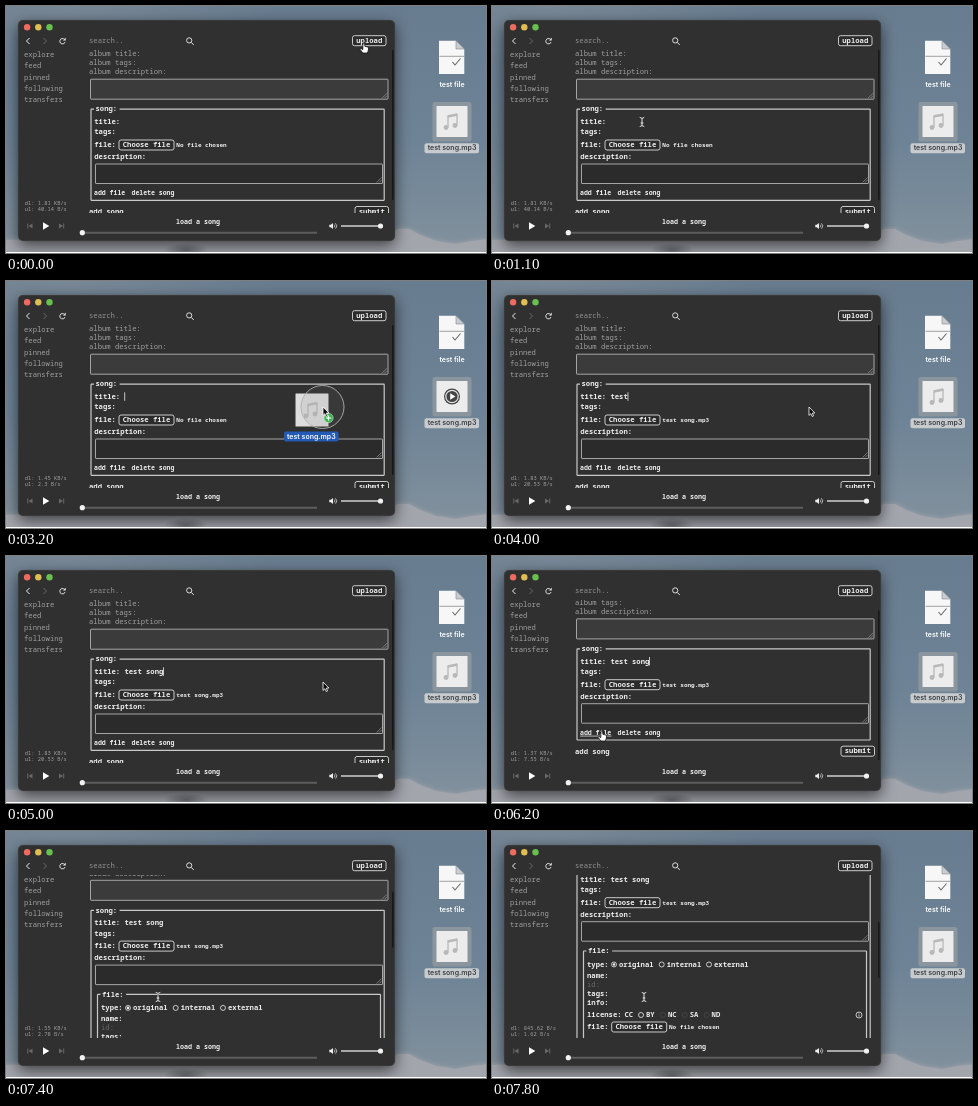
Animation of 480 by 247 pixels, one loop 8 s. Source, as an HTML page with a canvas:

```html
<!DOCTYPE html>
<html lang="en">
<head>
<meta charset="utf-8">
<style>
html, body { margin: 0; width: 100%; height: 100%; overflow: hidden; background: #6d8094; }
canvas { display: block; width: 480px; height: 247px; }
</style>
</head>
<body>
<canvas id="stage"></canvas>
<script>
const W = 480, H = 247, LOOP = 8000;
const canvas = document.getElementById('stage');
const ctx = canvas.getContext('2d');
const dpr = window.devicePixelRatio || 1;
canvas.width = W * dpr;
canvas.height = H * dpr;

const MONO = '"Noto Sans Mono", "DejaVu Sans Mono", monospace';
const SANS = 'Inter, "Open Sans", sans-serif';
const WHITE = '#ededed', GRAY = '#a0a0a0', DIM = '#686868', PANEL = '#303030';
const TITLE = 'test song';
const KEY_TIMES = [3700, 3800, 3900, 4000, 4200, 4400, 4600, 4700, 4800];
const FIRST_SCROLL = 10.3, FULL_SCROLL = 67.3;
const DROP = 3400, ADD_FILE = 6500;

// time, x, y
const POINTER = [
  [0, 358, 37], [300, 358, 37], [1000, 150, 116], [1400, 150, 116],
  [2150, 459, 113], [2450, 459, 113], [3150, 317, 126], [5100, 317, 126],
  [5900, 110, 175], [6500, 110, 175], [6900, 152, 166], [LOOP, 152, 166]
];
// time, download, upload
const RATES = [
  [0, '1.81 KB/s', '40.14 B/s'], [1500, '1.45 KB/s', '2.3 B/s'],
  [3900, '1.83 KB/s', '20.53 B/s'], [5500, '1.37 KB/s', '7.55 B/s'],
  [6600, '1.55 KB/s', '2.78 B/s'], [7500, '845.62 B/s', '1.62 B/s']
];

const ease = p => p * p * (3 - 2 * p);
const progress = (t, a, b) => ease(Math.min(1, Math.max(0, (t - a) / (b - a))));

function pointerAt(t) {
  const i = Math.max(1, POINTER.findIndex(p => p[0] > t));
  const [t0, x0, y0] = POINTER[i - 1], [t1, x1, y1] = POINTER[i];
  const k = progress(t, t0, t1);
  return { x: x0 + (x1 - x0) * k, y: y0 + (y1 - y0) * k };
}

function text(s, x, y, { size = 7.2, color = WHITE, align = 'left', font = MONO, weight = color === WHITE ? 600 : 500 } = {}) {
  ctx.font = `${weight} ${size}px ${font}`;
  ctx.fillStyle = color;
  ctx.textAlign = align;
  ctx.textBaseline = 'alphabetic';
  ctx.fillText(s, x, y + size * 0.31);
}

function box(x, y, w, h, r, fill, stroke, lw = 1) {
  ctx.beginPath();
  ctx.roundRect(x, y, w, h, r);
  if (fill) { ctx.fillStyle = fill; ctx.fill(); }
  if (stroke) { ctx.strokeStyle = stroke; ctx.lineWidth = lw; ctx.stroke(); }
}

function dot(x, y, r, fill, stroke, lw = 0.9) {
  ctx.beginPath();
  ctx.arc(x, y, r, 0, Math.PI * 2);
  if (fill) { ctx.fillStyle = fill; ctx.fill(); }
  if (stroke) { ctx.strokeStyle = stroke; ctx.lineWidth = lw; ctx.stroke(); }
}

function path(points, { fill, stroke, lw = 1, close = !!fill } = {}) {
  ctx.beginPath();
  points.forEach(([x, y], i) => i ? ctx.lineTo(x, y) : ctx.moveTo(x, y));
  if (close) ctx.closePath();
  if (fill) { ctx.fillStyle = fill; ctx.fill(); }
  if (stroke) { ctx.strokeStyle = stroke; ctx.lineWidth = lw; ctx.stroke(); }
}

const line = (x0, y0, x1, y1, stroke, lw = 1) => path([[x0, y0], [x1, y1]], { stroke, lw });

function haze(x, y, rx, ry, rgb, alpha) {
  ctx.save();
  ctx.translate(x, y);
  ctx.scale(rx, ry);
  const g = ctx.createRadialGradient(0, 0, 0, 0, 0, 1);
  g.addColorStop(0, `rgba(${rgb},${alpha})`);
  g.addColorStop(1, `rgba(${rgb},0)`);
  dot(0, 0, 1, g);
  ctx.restore();
}

function wallpaper() {
  const g = ctx.createLinearGradient(0, 0, 0, H);
  g.addColorStop(0, '#687c8f');
  g.addColorStop(0.55, '#6e8396');
  g.addColorStop(1, '#82919d');
  ctx.fillStyle = g;
  ctx.fillRect(0, 0, W, H);
  haze(60, 0, 210, 60, '140,150,158', 0.45);
  // cloud bank along the bottom
  ctx.save();
  ctx.shadowColor = '#a3a5ad';
  ctx.shadowBlur = 5 * dpr;
  path([[-5, 234], [380, 230], [392, 223], [403, 223], [414, 229], [430, 235],
    [450, 238], [466, 235], [485, 233], [485, 252], [-5, 252]], { fill: '#a3a5ad' });
  ctx.restore();
  haze(180, 244, 22, 7, '70,72,78', 0.6);
}

function note(x, y) {
  const c = '#b8b8b8';
  line(x - 4, y - 5, x - 4, y + 6, c, 1.3);
  line(x + 5, y - 7, x + 5, y + 4, c, 1.3);
  line(x - 4.5, y - 5, x + 5.5, y - 7, c, 2.4);
  dot(x - 6, y + 6, 2.4, c);
  dot(x + 3, y + 4, 2.4, c);
}

function songPage(x, y, half, playing) {
  box(x - half, y - half, half * 2, half * 2, 0.5, '#ececec');
  if (!playing) return note(x, y);
  dot(x, y, 8, '#454545');
  dot(x, y, 6.2, null, '#e6e6e6', 1.2);
  path([[x - 1.8, y - 3.2], [x - 1.8, y + 3.2], [x + 3.4, y]], { fill: '#fff' });
}

function desktop(t) {
  path([[433, 34.8], [450, 34.8], [458.3, 43], [458.3, 68], [433, 68]], { fill: '#f7f7f7' });
  path([[450, 34.8], [450, 43], [458.3, 43]], { fill: '#c9cdd1', stroke: '#85898d', lw: 0.6 });
  line(433.5, 50.3, 458, 50.3, '#8a8a8a', 0.8);
  path([[446.5, 56], [449, 59], [454.5, 52.5]], { stroke: '#666', lw: 1.1 });
  const label = { size: 7, font: SANS, weight: 600, align: 'center' };
  text('test file', 446, 79, { ...label, color: '#fff' });

  box(426.5, 96, 39, 39.5, 2.5, '#8b959e');
  songPage(446, 115.5, 15.5, t >= 2150 && t < 3600);
  box(418.5, 137.2, 54.5, 10, 2, '#c8cbce');
  text('test song.mp3', 446, 142, { ...label, color: '#3b3e42' });
}

function textarea(x, y, w, h, fill) {
  box(x, y, w, h, 0.5, fill, '#a5a5a5');
  for (const d of [2.5, 5]) line(x + w - 1 - d, y + h - 1, x + w - 1, y + h - 1 - d, '#a5a5a5', 0.6);
}

function fieldset(x, y, w, h, legend) {
  box(x, y, w, h, 0.5, null, '#c9c9c9', 1.2);
  ctx.fillStyle = PANEL;
  ctx.fillRect(x + 3, y - 4, legend.length * 4.32 + 4, 8);
  text(legend, x + 4.5, y);
}

function button(label, x, y, w) {
  box(x, y, w, 10, 2, '#2b2b2b', '#dcdcdc', 0.9);
  text(label, x + w / 2, y + 5, { align: 'center' });
}

function radio(label, x, y, { ring = WHITE, on = false } = {}) {
  dot(x, y, 2.5, null, ring, 0.8);
  if (on) dot(x, y, 1.3, ring);
  text(label, x + 5, y);
}

function fileRow(x, y, name) {
  text('file:', x, y);
  button('Choose file', x + 24.7, y - 5, 55);
  text(name, x + 82, y, { size: 6 });
}

function fileForm() {
  fieldset(91.5, 187.3, 283, 170, 'file:');
  text('type:', 95, 200.8);
  radio('original', 122, 200.8, { on: true });
  radio('internal', 169.7, 200.8);
  radio('external', 217, 200.8);
  text('name:', 95, 212);
  text('id:', 95, 220.9, { color: DIM });
  text('tags:', 95, 230);
  text('info:', 95, 239);
  text('license:', 95, 251.3);
  text('CC', 132.5, 251.3);
  radio('BY', 149, 251.3);
  ['NC', 'SA', 'ND'].forEach((s, i) => radio(s, 171 + i * 21.8, 251.3, { ring: '#484848' }));
  dot(367, 251.3, 3, null, WHITE, 0.8);
  line(367, 250.8, 367, 253, WHITE, 0.8);
  dot(367, 249.6, 0.45, WHITE);
  fileRow(95, 263.3, 'No file chosen');
}

function page(t) {
  const scroll = FIRST_SCROLL * progress(t, 5300, 5700)
    + (FULL_SCROLL - FIRST_SCROLL) * progress(t, 7220, 7790);
  const expanded = t >= ADD_FILE;
  ctx.save();
  ctx.beginPath();
  ctx.rect(70, 44, 318, 163);
  ctx.clip();
  ctx.translate(0, -scroll);

  ['album title:', 'album tags:', 'album description:'].forEach((s, i) =>
    text(s, 83, 48 + i * 9.1, { color: GRAY }));
  textarea(84.5, 73.2, 297.5, 20, '#3b3b3b');

  fieldset(85, 103.2, 293.2, expanded ? 280 : 91.1, 'song:');
  const typed = TITLE.slice(0, KEY_TIMES.filter(k => k <= t).length);
  text('title: ' + typed, 88.3, 115.6);
  if (t >= 1200 && t < ADD_FILE) {
    const caret = 88.3 + ctx.measureText('title: ' + typed).width + 0.2;
    line(caret, 111.3, caret, 119.8, WHITE, 0.8);
  }
  text('tags:', 88.3, 126.2);
  fileRow(88.3, 139, t < DROP ? 'No file chosen' : 'test song.mp3');
  text('description:', 88.3, 150.6);
  textarea(89.5, 158, 287, 19.5, '#2b2b2b');

  if (expanded) {
    fileForm();
  } else {
    text('add file', 88, 187, { size: 6.5 });
    text('delete song', 125.5, 187, { size: 6.5 });
    if (t >= 5850) line(88, 190.4, 119.5, 190.4, WHITE, 0.7);
    text('add song', 83, 205.7);
    button('submit', 349, 200.5, 33.5);
  }
  ctx.restore();
  const thumb = expanded ? 56 : 150;
  box(386, 44 + scroll * (expanded ? 0.7 : 1), 1.6, thumb, 0.8, '#181818');
}

function toolbar() {
  ['#ed6b60', '#e0be4f', '#68c04f'].forEach((c, i) => dot(21.1 + i * 11.2, 21.3, 3.2, c));
  path([[23.5, 32], [20.5, 35], [23.5, 38]], { stroke: WHITE });
  path([[37.5, 32], [40.5, 35], [37.5, 38]], { stroke: DIM });
  ctx.beginPath();
  ctx.arc(56.5, 35.2, 2.7, 0.3, 5.3);
  ctx.strokeStyle = WHITE;
  ctx.lineWidth = 0.9;
  ctx.stroke();
  path([[59.7, 31.6], [59.7, 34.6], [56.9, 34.4]], { fill: WHITE });
  text('search..', 83, 35, { color: '#929292' });
  dot(183.2, 34.4, 2.6, null, WHITE);
  line(185.2, 36.4, 187.7, 38.9, WHITE);
  button('upload', 346.5, 29.7, 33.5);
}

function sidebar(t) {
  ['explore', 'feed', 'pinned', 'following', 'transfers'].forEach((s, i) =>
    text(s, 18, 49 + i * 11.25, { color: GRAY }));
  const [, down, up] = RATES.filter(r => r[0] <= t).pop();
  const small = { size: 5.4, color: GRAY };
  text('dl: ' + down, 18.8, 197, small);
  text('ul: ' + up, 18.8, 203, small);
}

function player() {
  text('load a song', 192, 215.5, { size: 6.7, align: 'center' });
  for (const [x, d] of [[24, 1], [55.5, -1]]) {
    path([[x + 2.5 * d, 217.5], [x + 2.5 * d, 222.5], [x - 1.5 * d, 220]], { fill: DIM });
    line(x - 2.2 * d, 217.5, x - 2.2 * d, 222.5, DIM);
  }
  path([[37, 216.3], [37, 223.7], [43.3, 220]], { fill: '#fff' });
  line(76, 226.7, 311, 226.7, '#5c5c5c', 2);
  dot(76.3, 226.7, 2.6, '#f2f2f2');
  path([[323.3, 218.8], [324.8, 218.8], [327, 216.9], [327, 223.1], [324.8, 221.2], [323.3, 221.2]], { fill: WHITE });
  for (const r of [1.8, 3.6]) {
    ctx.beginPath();
    ctx.arc(327, 220, r, -0.85, 0.85);
    ctx.strokeStyle = WHITE;
    ctx.lineWidth = 0.7;
    ctx.stroke();
  }
  line(335, 220, 374.5, 220, '#a8a8a8', 2);
  dot(374.5, 220, 2.6, '#f2f2f2');
}

function appWindow(t) {
  ctx.save();
  ctx.shadowColor = 'rgba(0,0,0,0.6)';
  ctx.shadowBlur = 15 * dpr;
  ctx.shadowOffsetY = 5 * dpr;
  box(12, 14, 377, 221, 5, PANEL);
  ctx.restore();
  box(12.25, 14.25, 376.5, 220.5, 5, null, '#4d4d4d', 0.5);
  toolbar();
  sidebar(t);
  page(t);
  player();
}

function dragged(t, { x, y }) {
  if (t < 2450 || t >= DROP) return;
  const cx = x - 11, cy = y + 3;
  ctx.save();
  ctx.globalAlpha = 0.92;
  songPage(cx, cy, 16.5, false);
  ctx.restore();
  box(cx - 28, cy + 21.5, 54.5, 10, 2, '#2459b4');
  text('test song.mp3', cx - 0.7, cy + 26.5, { size: 7, font: SANS, weight: 600, align: 'center', color: '#fff' });
  dot(x - 0.5, y, 21.5, 'rgba(120,120,120,0.12)', '#b0b0b0', 0.9);
  if (x < 386) {
    dot(x + 5.5, y + 11, 4.6, '#35b34a', '#e8f5ea', 0.6);
    line(x + 2.9, y + 11, x + 8.1, y + 11, '#fff', 1.2);
    line(x + 5.5, y + 8.4, x + 5.5, y + 13.6, '#fff', 1.2);
  }
}

function hand() {
  path([[-1, 0], [0.6, 0], [0.9, 3.3], [4, 4], [4.6, 5], [4.2, 8], [3.3, 10], [-1.2, 10], [-4, 6.2], [-3.2, 5.4], [-1.2, 6.6]],
    { fill: '#fff', stroke: '#111', lw: 0.8 });
}

function arrow() {
  path([[0, 0], [0, 8.4], [1.9, 6.7], [3.2, 9.5], [4.6, 8.9], [3.3, 6.1], [5.9, 6]],
    { fill: '#0c0c0c', stroke: '#fff', lw: 0.8 });
}

function beam() {
  for (const [color, lw] of [['#222', 2], ['#f0f0f0', 1]]) {
    path([[-2.3, -4.6], [0, -3.6], [2.3, -4.6]], { stroke: color, lw });
    path([[-2.3, 4.6], [0, 3.6], [2.3, 4.6]], { stroke: color, lw });
    line(0, -3.6, 0, 3.6, color, lw);
    line(-1.4, 1, 1.4, 1, color, lw);
  }
}

function pointer(t, { x, y }) {
  ctx.save();
  ctx.translate(x, y);
  if (t < 400 || (t > 5850 && t < 6580)) hand();
  else if ((t > 900 && t < 1500) || t > 6700) beam();
  else arrow();
  ctx.restore();
}

function draw(now) {
  const t = now % LOOP;
  const p = pointerAt(t);
  ctx.setTransform(dpr, 0, 0, dpr, 0, 0);
  wallpaper();
  desktop(t);
  appWindow(t);
  dragged(t, p);
  pointer(t, p);
  ctx.fillStyle = '#fff';
  ctx.fillRect(0, H - 1, W, 1);
}

const start = performance.now();
function tick() {
  draw(performance.now() - start);
  requestAnimationFrame(tick);
}
tick();
</script>
</body>
</html>
```
